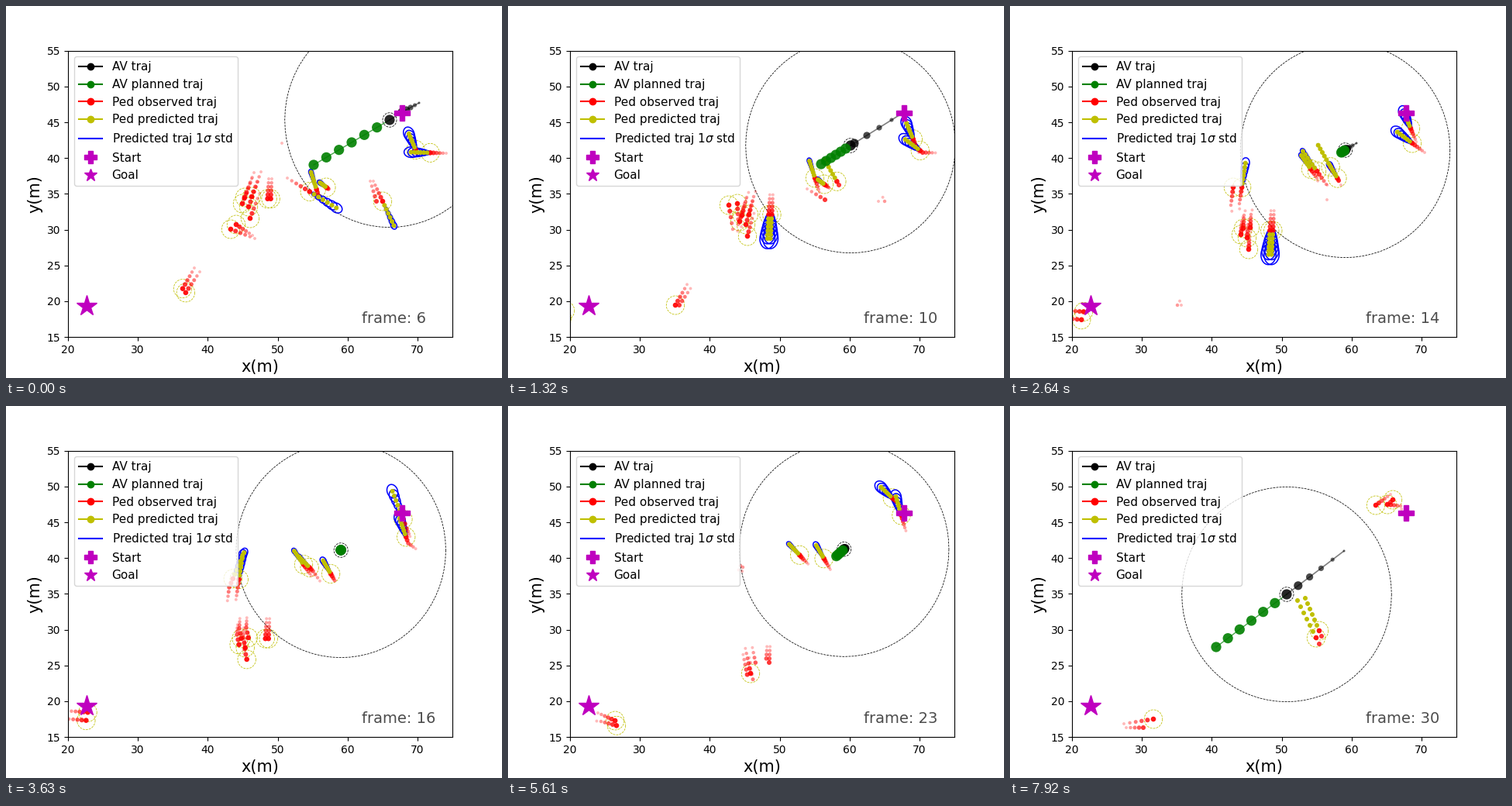
A matplotlib script for the animation above (8 s loop, 640x480 px).

```python
import numpy as np
import matplotlib.pyplot as plt
from matplotlib.animation import FuncAnimation
from matplotlib.collections import LineCollection
from matplotlib.lines import Line2D

INTERVAL, LOOP, STEP = 40, 8000, 330      # ms
FIRST, HISTORY, HORIZON = 6, 5, 6         # time steps
SENSE, PED_R, AV_R = 16.0, 1.3, 1.0       # metres
RANGE_R = 15.0
PX, PY = 496 / 55, 369.6 / 40             # pixels per metre
RED, YELLOW, GREEN, BLACK = (1, 0, 0), (.75, .75, 0), (0, .5, 0), (0, 0, 0)
AHEAD = np.arange(1, HORIZON + 1)
TURN = np.linspace(0, 2 * np.pi, 73)


def to_axes(p):
    """Stage pixels to metres."""
    p = np.asarray(p, float).reshape(-1, 2)
    return np.column_stack([20 + (p[:, 0] - 80) / PX,
                            15 + (427.2 - p[:, 1]) / PY])


def keyed(keys, t):
    """Linear path through (time, x, y) way points."""
    times, xs, ys = zip(*keys)
    return np.array([np.interp(t, times, xs), np.interp(t, times, ys)])


def ellipse(centre, a, b, heading=0.0):
    u, v = a * np.cos(TURN), b * np.sin(TURN)
    c, s = np.cos(heading), np.sin(heading)
    return to_axes(np.column_stack([centre[0] + u * c - v * s,
                                    centre[1] + u * s + v * c]))


def ring(centre, metres):
    return ellipse(centre, metres * PX, metres * PY)


class Walker:
    """Pedestrian on a way-point path; spread is the final 1-sigma radius."""

    def __init__(self, spread, *keys, shift=(0, 0), end=None):
        self.spread, self.keys, self.shift = spread, keys, shift
        self.start, self.end = keys[0][0], end or keys[-1][0]

    def alive(self, t):
        return self.start <= t <= self.end

    def at(self, t):
        return keyed(self.keys, t) + self.shift

    def forecast(self, t):
        """Keep the latest velocity while uncertainty grows like a random walk."""
        pos = self.at(t)
        v = pos - self.at(t - 1)
        pts = pos + AHEAD[:, None] * v
        sizes = self.spread * np.sqrt(AHEAD / HORIZON)
        heading = np.arctan2(v[1], v[0])
        return pts, [ellipse(p, a, 0.75 * a, heading) for p, a in zip(pts, sizes)]


AV = [(1, 533, 125), (5, 511, 137), (9, 447, 177), (11, 437, 183),
      (14, 432.5, 186), (17, 432, 186), (22, 435, 183.6), (25, 431, 187),
      (30, 357, 243)]
PLAN = [(6, -98, 58), (10, -38, 24), (14, -5, 3), (19, 7, -5), (23, -10, 9),
        (26, -87, 66), (30, -91, 68)]

CROWD = [(1, 321, 220), (6, 309, 252), (10, 303, 275), (14, 302, 292),
         (23, 314, 350)]
COUPLE = [(1, 341, 223), (22, 335, 331)]

peds = [
    # lower left: one pair leaving, one pair walking right
    Walker(3, (1, 243, 338), (10, 216, 386)),
    Walker(3, (1, 250, 343), (9, 221, 386)),
    Walker(3, (10, 74, 393), (18, 116, 396), (25, 147, 410), (30, 185, 404)),
    Walker(3, (10, 70, 403), (19, 120, 407), (25, 150, 415), (29, 172, 415)),
    # two who turn upward beside the legend
    Walker(6, (1, 321, 300), (6, 290, 288), (10, 285, 257), (14, 288, 234),
           (19, 300, 206)),
    Walker(7, (1, 318, 296), (6, 297, 282), (10, 296, 255), (19, 303, 208)),
    # brief visitors
    Walker(3, (1, 356, 177)),
    Walker(3, (1, 470, 226), (5, 478, 252)),
    Walker(5, (1, 474, 226), (6, 486, 252)),
    Walker(8, (1, 363, 222), (9, 409, 250)),
    # centre, heading up and left
    Walker(4, (4, 403, 244), (10, 396, 222), (20, 376, 193)),
    Walker(4, (4, 416, 236), (10, 408, 230), (14, 396, 213), (24, 374, 190)),
    Walker(2, (9, 427, 231), (15, 411, 203)),
    Walker(5, (13, 424, 225), (24, 406, 194)),
    # upper right
    Walker(9, (1, 568, 190), (9, 535, 189), (14, 519, 177), (19, 512, 157),
           (26, 504, 129), (30, 487, 127)),
    Walker(9, (5, 530, 189), (14, 517, 158), (19, 505.5, 128), (25, 491, 114),
           (30, 472, 128)),
    Walker(3, (29, 491, 124), (30, 494, 121)),
    # late pair below the vehicle
    Walker(1, (29, 399, 307), (30, 395, 299)),
    Walker(1, (29, 402, 297), (30, 399, 290)),
]
peds += [Walker(3, *CROWD, shift=(dx, dy), end=end) for dx, dy, end in [
    (-4, 3, 22), (8, -6, 21), (-1, -5, 23), (4, 7, 19), (6, 22, 20)]]
peds += [Walker(13, *COUPLE, shift=(dx, 0), end=end)
         for dx, end in [(-2, 21), (2, 22)]]

fig, ax = plt.subplots(figsize=(6.4, 4.8), dpi=100)
ax.set(xlim=(20, 75), ylim=(15, 55))
ax.set_xlabel("x(m)", fontsize=15)
ax.set_ylabel("y(m)", fontsize=15)
ax.set_xticks(range(20, 75, 10))
ax.set_yticks(range(15, 56, 5))


def outlines(color, width, style, z):
    return ax.add_collection(LineCollection(
        [], colors=color, linewidths=width, linestyles=style, zorder=z),
        autolim=False)


def dots(z):
    return ax.scatter([], [], linewidths=0, zorder=z)


def set_dots(coll, pts, radii, color, alphas):
    coll.set_offsets(to_axes(pts))
    coll.set_sizes((2 * np.asarray(radii) * 0.72) ** 2)
    rgba = np.tile([*color, 1.0], (len(radii), 1))
    rgba[:, 3] = alphas
    coll.set_facecolors(rgba)


av_rings = outlines("k", 0.55, "--", 1)
ped_rings = outlines("y", 0.55, "--", 1)
sigma_rings = outlines("b", 1.1, "-", 2)
red_dots = dots(2.2)
pred_dots = dots(2.4)
av_line, = ax.plot([], [], "k", lw=1.2, alpha=0.5, zorder=2.5)
plan_line, = ax.plot([], [], color=GREEN, lw=1, alpha=0.7, zorder=2.6)
av_dots = dots(2.7)
plan_dots = dots(2.8)
ax.plot(67.8, 46.3, "mP", ms=15, zorder=3)
ax.plot(22.7, 19.3, "m*", ms=20, zorder=3)
label = ax.text(62, 17, "", fontsize=14, alpha=0.7)

handles = [Line2D([], [], color=c, marker="o", label=text) for c, text in [
    ("k", "AV traj"), ("g", "AV planned traj"),
    ("r", "Ped observed traj"), ("y", "Ped predicted traj")]]
handles += [
    Line2D([], [], color="b", label=r"Predicted traj 1$\sigma$ std"),
    Line2D([], [], color="m", marker="P", ms=11, ls="", label="Start"),
    Line2D([], [], color="m", marker="*", ms=12, ls="", label="Goal")]
ax.legend(handles=handles, loc="upper left", fontsize=11).set_zorder(6)


def draw_vehicle(t):
    age = np.arange(HISTORY, -1, -1)
    trail = np.array([keyed(AV, t - k) for k in age])
    set_dots(av_dots, trail, 6.6 - age, BLACK, 0.85 - 0.07 * age)
    av_line.set_data(*to_axes(trail).T)

    pos = trail[-1]
    plan = pos + AHEAD[:, None] / HORIZON * keyed(PLAN, t)
    set_dots(plan_dots, plan, np.full(HORIZON, 6.6), GREEN, 0.9)
    plan_line.set_data(*to_axes(np.vstack([pos, plan])).T)
    av_rings.set_segments([ring(pos, RANGE_R), ring(pos, AV_R)])
    return pos


def draw_peds(t, av):
    seen, ages, circles, ahead, sigmas = [], [], [], [], []
    for ped in peds:
        for age in range(HISTORY, -1, -1):
            if ped.alive(t - age):
                seen.append(ped.at(t - age))
                ages.append(age)
        if not ped.alive(t):
            continue
        pos = ped.at(t)
        circles.append(ring(pos, PED_R))
        near = np.hypot(*((pos - av) / (PX, PY))) < SENSE
        if near and t > ped.start:
            pts, rings = ped.forecast(t)
            ahead.extend(pts)
            sigmas.extend(rings)
    ages = np.array(ages)
    set_dots(red_dots, seen, 3.3 - 0.27 * ages, RED, 0.92 - 0.13 * ages)
    set_dots(pred_dots, ahead, np.full(len(ahead), 3.0), YELLOW, 1)
    ped_rings.set_segments(circles)
    sigma_rings.set_segments(sigmas)


def update(i):
    t = FIRST + int(i * INTERVAL + INTERVAL / 2) // STEP
    draw_peds(t, draw_vehicle(t))
    label.set_text(f"frame: {t}")
    return []


anim = FuncAnimation(fig, update, frames=LOOP // INTERVAL, interval=INTERVAL,
                     init_func=lambda: update(0), repeat=True, repeat_delay=0)
plt.show()
```
